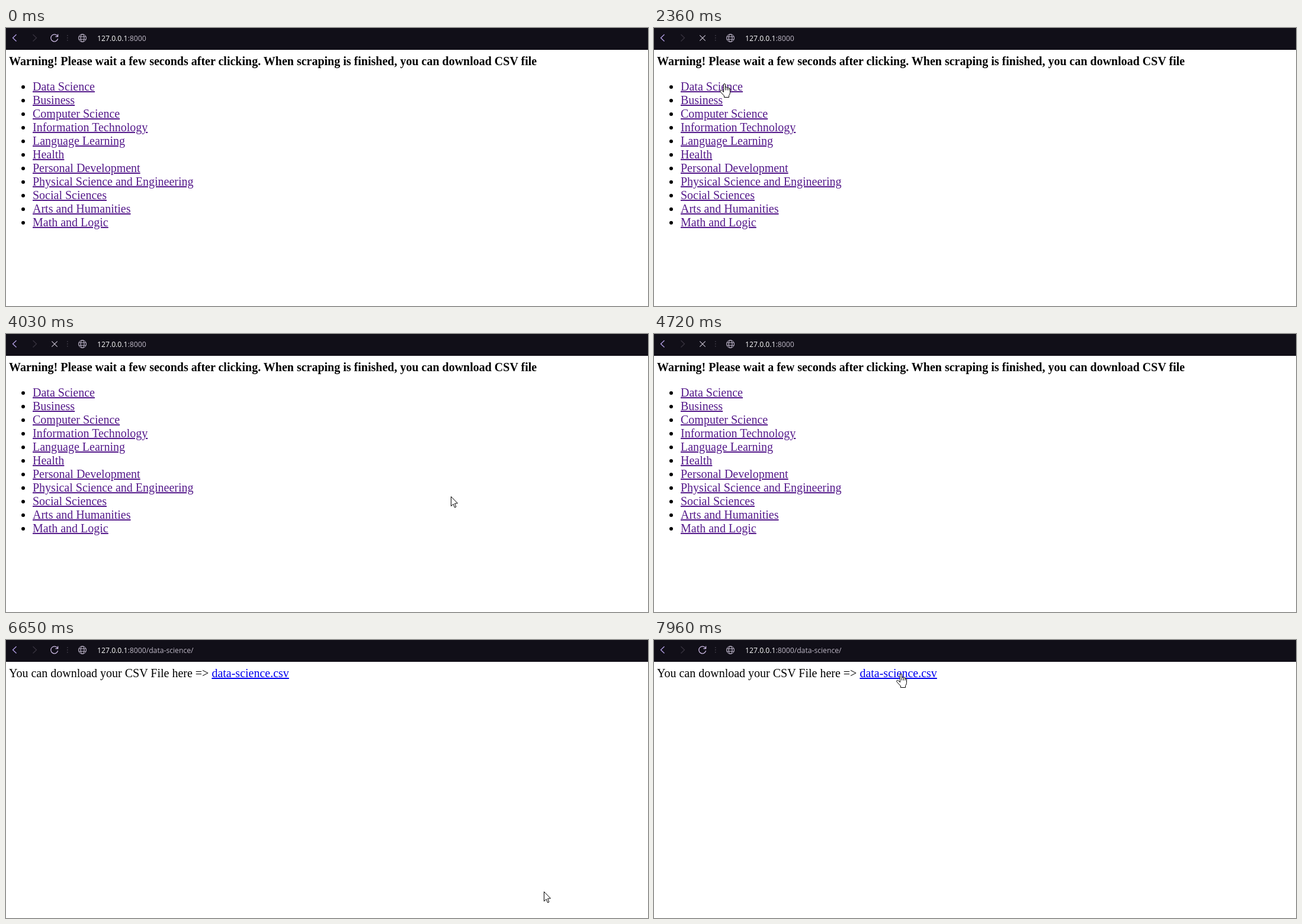
An HTML page with a canvas that plays this animation: 1084 by 471 pixels, repeating every 8000 ms.

```html
<!DOCTYPE html>
<html lang="en">
<head>
<meta charset="utf-8">
<title>Scraper demo</title>
<style>
  html, body { margin: 0; width: 100%; height: 100%; overflow: hidden; background: #fff; }
  body { position: relative; font: 20px/23px "Liberation Serif", "Times New Roman", serif; color: #000; }
  .page { position: absolute; left: 5px; top: 45px; white-space: nowrap; }
  h4 { margin: 0 0 20px; font-size: 20px; }
  ul { margin: 0; padding-left: 40px; }
  .link { color: #551a8b; text-decoration: underline; }
  #result .link { color: #00e; }
  canvas { position: absolute; left: 0; top: 0; }
</style>
</head>
<body>
<div class="page" id="menu">
  <h4>Warning! Please wait a few seconds after clicking. When scraping is finished, you can download CSV file</h4>
  <ul></ul>
</div>
<div class="page" id="result" hidden>You can download your CSV File here =&gt; <span class="link">data-science.csv</span></div>
<canvas width="1084" height="471"></canvas>
<script>
const LOOP = 8000, STEP = 70, PAGE_CHANGE = 5120;
const CLICK_HOLD = 150, CLICK_LENGTH = 340, LOAD_DELAY = 270;

const topics = ['Data Science', 'Business', 'Computer Science', 'Information Technology',
  'Language Learning', 'Health', 'Personal Development', 'Physical Science and Engineering',
  'Social Sciences', 'Arts and Humanities', 'Math and Logic'];
const menu = document.getElementById('menu');
const result = document.getElementById('result');
menu.querySelector('ul').innerHTML =
  topics.map(name => `<li><span class="link">${name}</span></li>`).join('');

const canvas = document.querySelector('canvas');
const ctx = canvas.getContext('2d');

const point = (x, y) => ({ x, y });
const mix = (a, b, u) => a + (b - a) * u;
const easeOut = u => 1 - (1 - u) ** 1.6;
// S-curve with its steepest part after the middle.
const easeLate = u => u ** 1.68 / (u ** 1.68 + 1.82 * (1 - u) ** 1.68);

// Pointer moves; bend delays the vertical part so that the path curves.
const firstLink = point(114, 94), fileLink = point(416, 48);
const moves = [
  { start: 110, end: 950, from: point(961, 485), to: firstLink, ease: easeOut, bend: 0 },
  { start: 2210, end: 4730, from: firstLink, to: point(984, 480), ease: easeLate, bend: 0.775 },
  { start: 6580, end: 7140, from: point(1025, 516), to: fileLink, ease: easeOut, bend: 0 },
  { start: 7280, end: 7420, from: fileLink, to: point(416, 57), ease: easeOut, bend: 0 }
];
const clicks = [
  { time: 1340, at: point(113, 94), loaded: PAGE_CHANGE },
  { time: 7620, at: point(415, 57), loaded: 7960 }
];

function pointerAt(t) {
  const move = moves.filter(m => m.start <= t).pop() || moves[0];
  const elapsed = Math.max(0, Math.floor((t - move.start) / STEP) * STEP);
  const e = move.ease(Math.min(1, elapsed / (move.end - move.start)));
  return point(
    Math.round(mix(move.from.x, move.to.x, e)),
    Math.round(mix(move.from.y, move.to.y, mix(e, e ** 3, move.bend)))
  );
}

function stroke(color, width, d) {
  ctx.strokeStyle = color;
  ctx.lineWidth = width;
  ctx.stroke(new Path2D(d));
}

function drawToolbar(t) {
  const loading = clicks.some(c => t >= c.time + LOAD_DELAY && t < c.loaded);
  ctx.fillStyle = '#110f18';
  ctx.fillRect(0, 0, 1084, 37);
  stroke('#b4a0e6', 1.3, 'M17.5 11 l-6 5.7 l6 5.8');
  stroke('#37333f', 1.3, 'M45.5 11 l6 5.7 l-6 5.8');
  if (loading) {
    stroke('#c9c3d2', 1.1, 'M77.3 12.3 l9.4 9.4 m0 -9.4 l-9.4 9.4');
  } else {
    stroke('#cdbbe4', 1.3, 'M87 14 A6 6 0 1 0 87.6 18.2 M87.6 10.5 v4.1 h-4.2');
  }
  ctx.fillStyle = '#45414d';
  for (let y = 12; y <= 20; y += 4) ctx.fillRect(103, y, 1.5, 1.5);

  ctx.beginPath();
  for (const radius of [6.5, 3]) {
    ctx.moveTo(129 + radius, 17);
    ctx.ellipse(129, 17, radius, 6.5, 0, 0, 2 * Math.PI);
  }
  for (const y of [14.8, 19.2]) {
    ctx.moveTo(123, y);
    ctx.lineTo(135, y);
  }
  ctx.strokeStyle = '#c9c0d6';
  ctx.lineWidth = 1;
  ctx.stroke();

  const host = '127.0.0.1';
  const rest = t < PAGE_CHANGE ? ':8000' : ':8000/data-science/';
  ctx.font = '12.2px "Open Sans", "Noto Sans", sans-serif';
  ctx.fillStyle = '#fff';
  ctx.fillText(host, 154, 21.5);
  ctx.fillStyle = '#bdb7c5';
  ctx.fillText(rest, 154 + ctx.measureText(host).width, 21.5);
}

function drawClick(t, { time, at }) {
  const age = t - time;
  if (age < 0 || age >= CLICK_LENGTH) return;
  const fade = Math.max(0, Math.ceil((age - CLICK_HOLD + 1) / 63)) / 4;
  ctx.fillStyle = `rgba(255, 245, 0, ${0.6 * (1 - fade)})`;
  ctx.beginPath();
  ctx.arc(at.x, at.y, 12, 0, 2 * Math.PI);
  ctx.fill();
}

const arrow = new Path2D('M.5 .5 V16.6 L4.2 13.1 L6.6 18.9 L9 17.9 L6.6 12.2 L11.5 11.8 Z');
const hand = new Path2D('M-.5 2 Q-.5 .5 1 .5 Q2.5 .5 2.5 2 V6.5 Q4 5 5.5 7 Q7 6 8.3 8 Q10.5 7.5 10.5 10 ' +
  'V15.5 Q10.5 18 8.5 20.5 V23.5 H.5 V21 L-5.5 14.5 Q-7.2 12.4 -5.8 11.5 Q-4.5 10.7 -3 12.2 L-.5 14.5 Z');
const knuckles = new Path2D('M2.5 6.5 V11.5 M5.5 7 V11.5 M8.3 8 V11.5');

function drawPointer(t) {
  const { x, y } = pointerAt(t);
  const onLink = t < PAGE_CHANGE
    ? x < 150 && y > 88 && y < 111
    : x > 347 && x < 478 && y > 45 && y < 69;
  const shape = onLink ? hand : arrow;
  ctx.save();
  ctx.translate(x, y);
  ctx.fillStyle = '#fff';
  ctx.strokeStyle = '#000';
  ctx.lineWidth = 1;
  ctx.fill(shape);
  ctx.stroke(shape);
  if (onLink) ctx.stroke(knuckles);
  ctx.restore();
}

function frame(now) {
  const t = now % LOOP;
  menu.hidden = t >= PAGE_CHANGE;
  result.hidden = !menu.hidden;
  ctx.clearRect(0, 0, canvas.width, canvas.height);
  drawToolbar(t);
  clicks.forEach(click => drawClick(t, click));
  drawPointer(t);
  requestAnimationFrame(frame);
}
requestAnimationFrame(frame);
</script>
</body>
</html>
```
